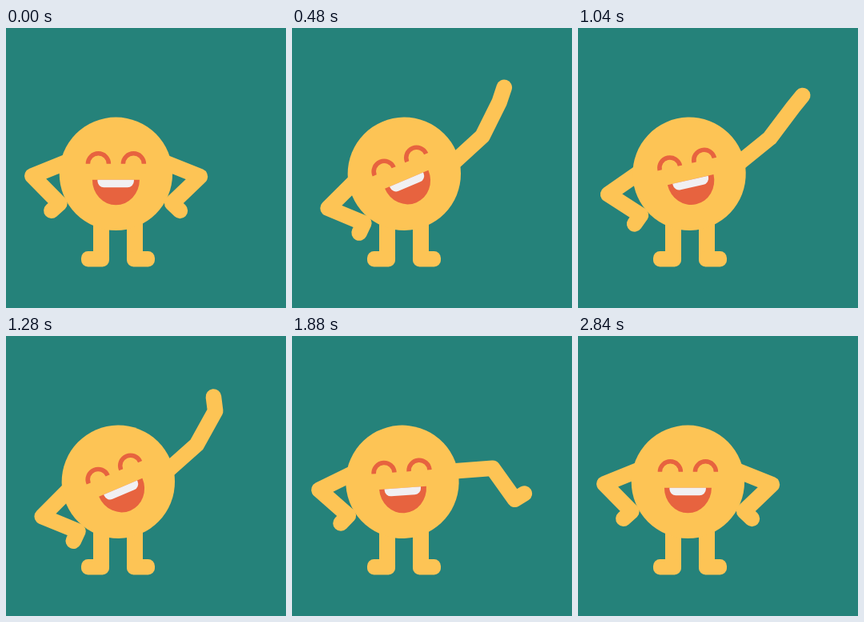
Animation, 350 px wide and 350 px high, one loop 3 s. Source, as an HTML page:

```html
<!DOCTYPE html>
<html lang="en">
<head>
<meta charset="utf-8">
<title>Waving character</title>
<style>
  html, body { margin: 0; width: 100%; height: 100%; overflow: hidden; background: #25827a; }
  svg { display: block; width: 100%; height: 100%; }
  .skin { fill: #fdc455; }
  .limb { fill: none; stroke: #fdc455; stroke-width: 19.6; stroke-linecap: round; stroke-linejoin: round; }
  .eye { fill: none; stroke: #e7633f; stroke-width: 5.5; }
  .mouth { fill: #e7633f; }
  .teeth { fill: #f1f0f2; }
</style>
</head>
<body>
<svg viewBox="0 0 350 350">
  <g class="skin">
    <path d="M109 235H129V290H109ZM151 235H171V290H151Z"/>
    <rect x="94" y="279" width="35" height="19.5" rx="8.5"/>
    <rect x="151" y="279" width="35" height="19.5" rx="8.5"/>
  </g>
  <path id="waveArm" class="limb"/>
  <g id="body">
    <path class="limb" d="M-57.5-16.5L-104.5 2.5L-70.5 37L-80.5 46"/>
    <circle class="skin" r="70.7"/>
    <path class="eye" d="M-35-12.5a13 13 0 0 1 26 0M9-12.5a13 13 0 0 1 26 0"/>
    <path class="mouth" d="M-29.5 7.5H29.5A29.5 31.5 0 0 1-29.5 7.5Z"/>
    <path class="teeth" d="M-23 7.5H22.5V9a8 8 0 0 1-8 8H-15a8 8 0 0 1-8-8Z"/>
  </g>
</svg>
<script>
  const LOOP = 3000, STEP = 40, LAST = 2840;
  const CENTER = { x: 137.4, y: 182.3 };
  const SHOULDER = { x: 201, y: 169 };
  const FOREARM = 48;
  const HAND_DELAY = 120;

  // Turning points [time, angle]: two waves, then back to the hip
  const RAISE = [[0, -22], [490, 42.5], [860, 19], [1115, 44], [2470, -22]];
  const TILT = [[0, 0], [500, 23], [910, 5], [1200, 23.5], [2140, 0]];

  const waveArm = document.getElementById('waveArm');
  const body = document.getElementById('body');

  // Cosine easing from each turning point to the next
  function swing(turns, time) {
    const next = turns.findIndex(([t]) => t > time);
    if (next < 0) return turns[turns.length - 1][1];
    if (next === 0) return turns[0][1];
    const [t0, a] = turns[next - 1], [t1, b] = turns[next];
    return a + (b - a) * (1 - Math.cos(Math.PI * (time - t0) / (t1 - t0))) / 2;
  }

  const rad = deg => deg * Math.PI / 180;
  const reach = (from, angle, length) => ({
    x: from.x + length * Math.cos(rad(angle)),
    y: from.y - length * Math.sin(rad(angle))
  });

  function draw(time) {
    // The forearm amplifies the upper arm; the hand trails behind
    const upper = swing(RAISE, time);
    const fore = 3.1 * upper - 68;
    const hand = 2.15 * swing(RAISE, time - HAND_DELAY) + 3;

    const elbow = reach(SHOULDER, upper, Math.min(50, 49 + upper / 5));
    const wrist = reach(elbow, fore, FOREARM);
    const tip = reach(wrist, hand, 13.5 + 5.5 * Math.max(0, Math.cos(rad(hand - fore))));
    const points = [SHOULDER, elbow, wrist, tip].map(p => `${p.x.toFixed(2)} ${p.y.toFixed(2)}`);
    waveArm.setAttribute('d', 'M' + points.join('L'));

    const tilt = swing(TILT, time);
    const x = CENTER.x + 7.5 * Math.sin(rad(tilt));
    body.setAttribute('transform', `translate(${x} ${CENTER.y}) rotate(${-tilt})`);
  }

  const start = performance.now();
  function tick() {
    const time = (performance.now() - start) % LOOP;
    draw(Math.min(Math.floor(time / STEP) * STEP, LAST));
    requestAnimationFrame(tick);
  }
  tick();
</script>
</body>
</html>
```
